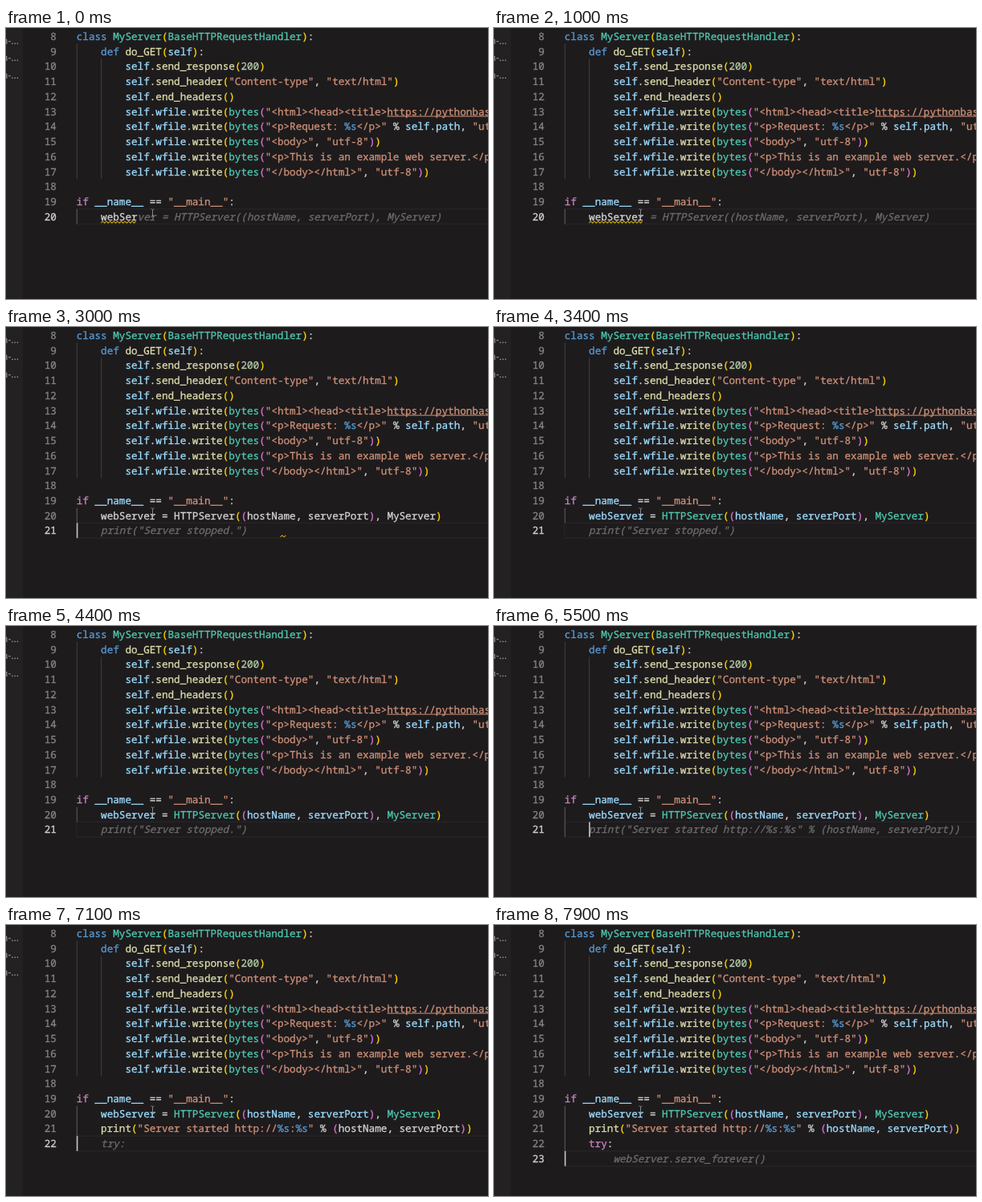
An HTML page for the animation above (8 s loop, 600 by 338 pixels).

```html
<!DOCTYPE html>
<html lang="en">
<head>
<meta charset="utf-8">
<style>
html, body { margin: 0; width: 100%; height: 100%; overflow: hidden; background: #1e1b1d; }
svg { display: block; width: 600px; height: 338px; }
text { font: 500 12.63px "Noto Sans Mono", "DejaVu Sans Mono", monospace; white-space: pre; text-rendering: geometricPrecision; stroke-width: .3px; }
.ghost { font-style: italic; font-weight: 400; }
.side { font: 12px "Noto Sans", sans-serif; }
</style>
</head>
<body>
<svg viewBox="0 0 600 338">
  <rect width="600" height="338" fill="#1e1b1d"/>
  <rect width="21" height="338" fill="#242123"/>
  <g fill="#a4a4a4">
    <text class="side" x="-5" y="19.5">n-...</text>
    <text class="side" x="-5" y="41">n-...</text>
    <text class="side" x="-5" y="63">n-...</text>
  </g>
  <g id="fixed"></g>
  <g id="live"></g>
  <path d="M180.5 226h1.2l.8.8.8-.8h1.2M182.5 226.6v8.4M180.5 235.6h1.2l.8-.8.8.8h1.2" fill="none" stroke="#a0a0a0" stroke-width=".8"/>
</svg>
<script>
const LOOP = 8000, LEFT = 87.8, CHAR = 7.58, ROW = 18.73, FIRST = 8;
const PLAIN = '#d4d4d4', VARIABLE = '#9cdcfe', TYPE = '#4ec9b0', STRING = '#ce9178', BLUE = '#569cd6';
const BRACKETS = ['#ffd700', '#da70d6', '#179fff'];
const WORDS = {};
const colour = (value, words) => words.split(' ').forEach(w => WORDS[w] = value);
colour(BLUE, 'class def');
colour('#c586c0', 'if try');
colour(TYPE, 'MyServer BaseHTTPRequestHandler HTTPServer bytes');
colour('#dcdcaa', 'do_GET send_response send_header end_headers write print');

const write = s => `        self.wfile.write(bytes(${s}, "utf-8"))`;
const CODE = [
  'class MyServer(BaseHTTPRequestHandler):',
  '    def do_GET(self):',
  '        self.send_response(200)',
  '        self.send_header("Content-type", "text/html")',
  '        self.end_headers()',
  write('"<html><head><title>https://pythonbas'),
  write('"<p>Request: %s</p>" % self.path'),
  write('"<body>"'),
  write('"<p>This is an example web server.</p>"'),
  write('"</body></html>"'),
  '',
  'if __name__ == "__main__":'
];
const SERVER = '    webServer = HTTPServer((hostName, serverPort), MyServer)';
const STARTED = '    print("Server started http://%s:%s" % (hostName, serverPort))';
// The caret flips between hidden and visible at each of these times.
const CARET_FLIPS = [100, 900, 1400, 1900, 2500, 3400, 3900, 4400, 4900, 6000, 6500, 7300, 7800];

const columnX = col => LEFT + col * CHAR;
const baseline = line => 15 + (line - FIRST) * ROW;
const rowTop = line => baseline(line) - 14;
const escape = s => s.replace(/&/g, '&amp;').replace(/</g, '&lt;');
const label = (x, line, fill, s, extra = '') =>
  `<text x="${x}" y="${baseline(line)}" fill="${fill}" stroke="${fill}" ${extra}>${escape(s)}</text>`;
const rect = (x, y, w, h, fill) => `<rect x="${x}" y="${y}" width="${w}" height="${h}" fill="${fill}"/>`;

function codeLine(line, source, resolved = true) {
  let depth = 0, out = '';
  const put = (col, s, fill) => out += label(columnX(col), line, fill, s);
  for (const { 0: token, index } of source.matchAll(/"[^"]*"?|\d+|\w+|[()]|[^\s\w"()]+/g)) {
    if (token[0] === '"') {
      for (const part of token.matchAll(/%s|(?:(?!%s).)+/g))
        put(index + part.index, part[0], part[0] === '%s' ? BLUE : STRING);
    } else if (token === '(') put(index, token, BRACKETS[depth++]);
    else if (token === ')') put(index, token, BRACKETS[--depth] || PLAIN);
    else if (/^\d/.test(token)) put(index, token, '#b5cea8');
    else if (/^\w/.test(token)) {
      const fill = WORDS[token] || VARIABLE;
      put(index, token, !resolved && (fill === VARIABLE || fill === TYPE) ? PLAIN : fill);
    } else put(index, token, PLAIN);
  }
  return out;
}

const lineNumber = (line, active) =>
  label(columnX(0) - 25, line, active ? '#d0d0d0' : '#858585', String(line), 'text-anchor="end"');
const guide = (col, from, to, fill) =>
  rect(columnX(col), rowTop(from), 1, (to - from + 1) * ROW, fill);

function squiggle(from, to, line) {
  let d = '';
  for (let x = from, i = 0; x <= to; x += 2.3, i++)
    d += `${i ? 'L' : 'M'}${x} ${baseline(line) + (i % 2 ? 1.4 : 3.4)}`;
  return `<path d="${d}" fill="none" stroke="#cca700" stroke-width="1.1"/>`;
}

function editorAt(t) {
  if (t < 2800) {
    const typed = 10 + Math.max(0, Math.min(3, Math.floor((t - 100) / 100)));
    return { line: 20, caret: typed, done: [SERVER.slice(0, typed)], ghost: SERVER.slice(typed), ghostCol: typed };
  }
  if (t < 2900) return { line: 20, caret: SERVER.length, done: [SERVER] };
  if (t < 5300) return { line: 21, caret: 0, done: [SERVER], ghost: 'print("Server stopped.")' };
  if (t < 6700) return { line: 21, caret: 4, done: [SERVER], ghost: t < 5400 ? '' : STARTED.trim() };
  if (t < 6800) return { line: 21, caret: STARTED.length, done: [SERVER, STARTED] };
  if (t < 7800) return { line: 22, caret: 0, done: [SERVER, STARTED], ghost: 'try:' };
  return { line: 23, caret: 0, done: [SERVER, STARTED, '    try:'],
    ghost: t < 7900 ? '' : 'webServer.serve_forever()', ghostCol: 8 };
}

function liveMarkup(t) {
  const { line, caret, done, ghost, ghostCol = 4 } = editorAt(t);
  const resolved = [t >= 3200, t >= 7200, true];
  const lastIndented = Math.max(19 + done.length, caret ? line : 0);
  let out = `<rect x="${columnX(0)}" y="${rowTop(line)}" width="520" height="${ROW}" fill="none" stroke="#272426" stroke-width="1.4"/>`;
  out += guide(0, 20, lastIndented, '#5c5c5c');
  for (let n = 20; n <= line; n++) out += lineNumber(n, n === line);
  done.forEach((source, i) => out += codeLine(20 + i, source, resolved[i]));
  if (ghost) out += label(columnX(ghostCol), line, '#6c6c6c', ghost, 'class="ghost"');
  if (t < 2800) out += squiggle(columnX(4), columnX(t < 800 ? 10 : 13), 20);
  if (t >= 2900 && t < 3200) out += squiggle(341.5, 350, 21);
  if (CARET_FLIPS.filter(flip => flip <= t).length % 2)
    out += rect(columnX(caret), rowTop(line), 1.6, ROW, '#c4c4c4');
  return out;
}

const fixed = document.getElementById('fixed'), live = document.getElementById('live');
fixed.innerHTML = guide(0, 9, 17, '#404040') + guide(4, 10, 17, '#404040') +
  CODE.map((source, i) => lineNumber(FIRST + i) + codeLine(FIRST + i, source)).join('') +
  rect(columnX(51), baseline(13) + 1, 130, 1, STRING);

let shown = -1;
function frame(now) {
  const step = Math.floor(now % LOOP / 100);
  if (step !== shown) live.innerHTML = liveMarkup((shown = step) * 100);
  requestAnimationFrame(frame);
}
frame(performance.now());
</script>
</body>
</html>
```
